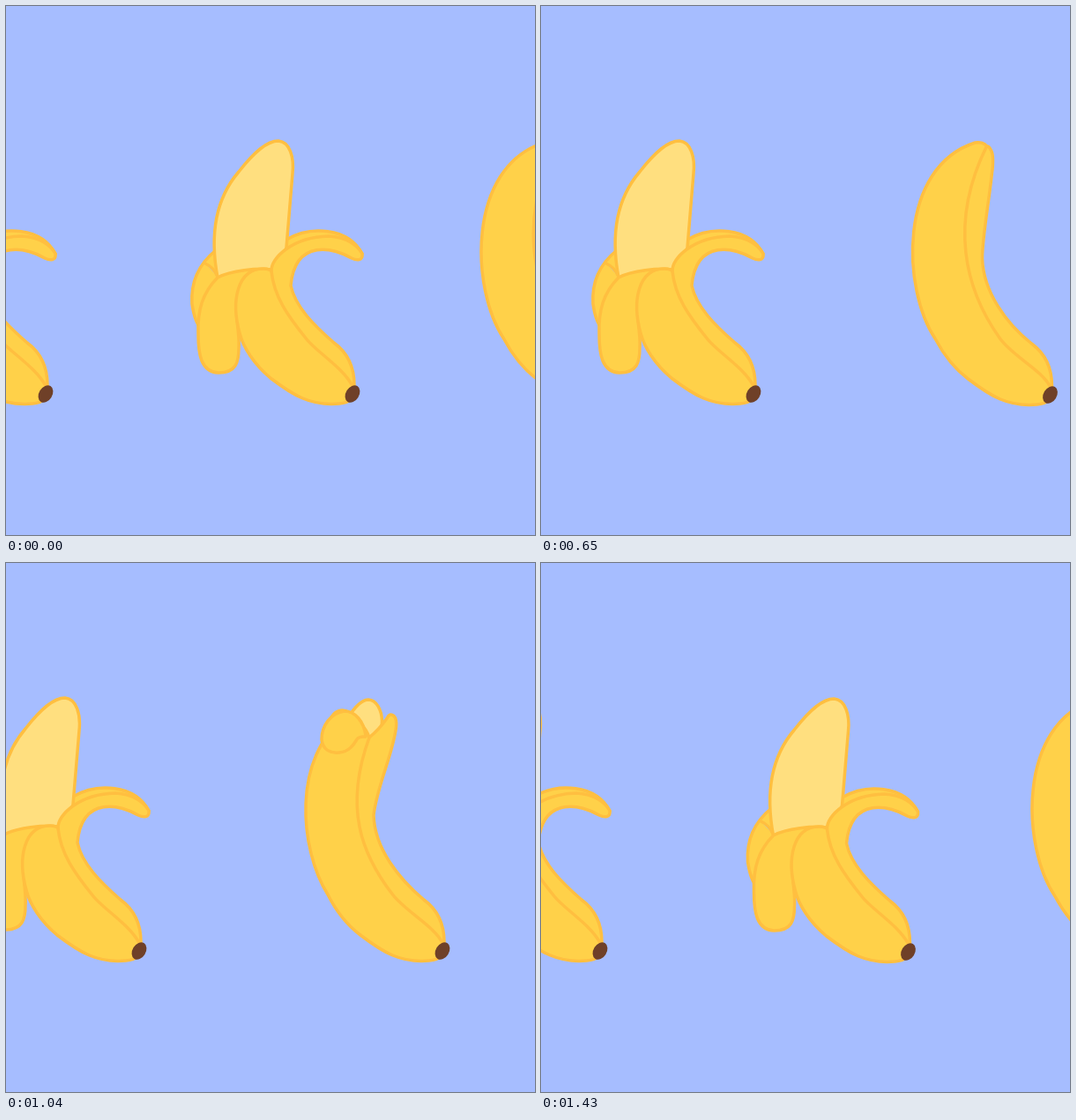
An HTML page with a canvas that plays this animation: 600x600 px, repeating every 1560 ms.

```html
<!DOCTYPE html>
<html lang="en">
<head>
<meta charset="utf-8">
<title>Peeling bananas</title>
<style>
html, body { margin: 0; width: 100%; height: 100%; overflow: hidden; background: #a6bdff; }
canvas { display: block; width: 100vw; height: 100vh; }
</style>
</head>
<body>
<canvas id="stage" width="600" height="600"></canvas>
<script>
const ctx = document.getElementById('stage').getContext('2d');
const STEP = 130, STEPS = 12;
const PEEL = '#ffd149', LINE = '#ffbf40', FLESH = '#ffdf7f', STEM = '#6f4028';

// Each part in three poses: closed, half peeled, open.
const parts = {
  back: [
    'M300 163 C298 161 293 162 290 166 C289 168 289 170 290 172 L300 170 Z M295 168 Q296 168 297 169',
    'M273 176 C262 168 245 173 242 190 C241 196 243 200 246 204 L262 197 Z M258 203 Q259 204 260 206',
    'M238 277 C222 290 209 308 211 338 C213 352 217 362 222 367 L245 330 Z M226 292 Q235 296 240 307'
  ],
  strip: [
    'M322 185 L322 180 C323 176 325 172 326 172 L325 180 Z',
    'M330 210 L332 205 C336 190 346 178 350 182 L342 190 Z',
    'M316 281 L318 265 C345 249 388 251 404 281 L366 263 Z'
  ],
  flesh: [
    'M300 175 C300 172 301 171 302 170 C304 164 307 158 309 158 C313 158 318 162 320 172 L320 180 C319 182 318 183 317 184 Z',
    'M262 200 C262 199 262 198 263 194 C275 172 293 152 309 152 C324 153 330 172 329 186 L327 212 C320 220 305 228 299 238 Z',
    'M240 308 C230 255 240 216 264 188 C282 165 296 153 309 153 C322 154 327 172 325 190 L318 274 C315 285 305 295 301 303 Z'
  ],
  flap: [
    'M326 173 C327 156 320 140 306 139 C294 140 288 155 289 163 C293 172 300 172 306 170 C314 168 316 158 318 160 C321 162 326 172 326 173 Z',
    'M286 219 C281 204 268 196 258 197 C238 200 224 215 223 237 C221 252 232 260 246 260 C262 260 270 252 274 240 C277 230 280 222 286 221 Z',
    'M301 299 C285 297 255 300 240 308 C223 325 217 345 218 372 C218 395 221 415 241 416 C261 416 264 404 264 388 C265 375 262 365 262 350 Z'
  ],
  body: [
    'M321 158 C323 158 324 159 325 161 C327 164 328 168 328 173 C328 178 328 183 327 188 C324 218 316 262 316 285 C317 323 343 359 372 382 C387 393 395 409 395 430 C395 446 390 450 378 451 C345 454 325 441 300 422 C284 410 272 394 263 377 C225 321 220 182 308 154 C314 153 319 155 321 158 Z',
    'M299 238 C322 217 330 202 336 190 C337 180 341 174 348 174 C353 174 354 179 354 184 C351 212 321 245 314 287 C315 325 345 358 372 382 C387 393 395 409 395 430 C395 446 390 450 378 451 C345 454 325 441 300 422 C284 410 272 394 263 375 C237 330 223 255 260 196 C281 202 295 220 299 238 Z',
    'M301 301 C300 286 325 262 366 261 C387 262 399 272 404 281 C405 289 398 289 392 286 C374 275 328 262 323 317 C328 341 349 362 372 382 C387 393 395 409 395 430 C395 446 390 450 378 451 C345 454 325 441 300 422 C281 406 269 387 265 371 C255 335 262 298 292 298 C298 298 301 300 301 301 Z'
  ],
  crease: [
    'M321 158 C278 245 296 320 336 376 C350 396 384 412 393 431',
    'M299 238 C284 310 306 340 337 376 C352 394 384 412 393 431',
    'M301 301 C304 330 320 352 341 378 C352 392 382 410 393 431'
  ]
};

// Stem position at every step, from entering on the right to leaving on the left.
const FIRST = -4;
const stemX = [767, 743, 728, 713, 695, 672, 649, 625.5, 602, 577.5, 553, 523, 495, 467,
  441, 416.5, 393, 365, 337, 305, 273, 241, 209, 181, 151, 121, 94, 67, 45, 22, 0, -23];

// Pose between closed (0), half peeled (1) and open (2).
const pose = n => Math.min(2, Math.max(0, (n - 7) / 2));
const lift = n => n < 8 || n === 11 ? 1 : n === 9 ? -2 : 0;

function blend(name, k) {
  const i = Math.min(1, Math.floor(k));
  const [from, to] = [parts[name][i], parts[name][i + 1]];
  const ends = to.match(/\d+/g);
  let j = 0;
  return new Path2D(from.replace(/\d+/g, a => +a + (ends[j++] - a) * (k - i)));
}

function shape(name, k, fill) {
  const path = blend(name, k);
  if (fill) {
    ctx.fillStyle = fill;
    ctx.fill(path);
  }
  ctx.stroke(path);
}

function banana(n) {
  const x = stemX[n - FIRST];
  if (x === undefined) return;
  const k = pose(n);
  ctx.save();
  ctx.translate(x - 393, lift(n));
  if (k > 0) {
    shape('back', k, PEEL);
    shape('strip', k, PEEL);
    shape('flesh', k, FLESH);
  }
  if (k === 2) shape('flap', k, PEEL);
  shape('body', k, PEEL);
  shape('crease', k);
  if (k > 0 && k < 2) shape('flap', k, PEEL);
  ctx.fillStyle = STEM;
  ctx.beginPath();
  ctx.ellipse(393, 440, 7.5, 10.5, 0.55, 0, 7);
  ctx.fill();
  ctx.restore();
}

function draw() {
  const step = Math.floor(performance.now() / STEP) % STEPS;
  ctx.fillStyle = '#a6bdff';
  ctx.fillRect(0, 0, 600, 600);
  ctx.strokeStyle = LINE;
  ctx.lineWidth = 3.5;
  ctx.lineJoin = ctx.lineCap = 'round';
  for (let lap = -1; lap < 3; lap++) banana(step + lap * STEPS);
  requestAnimationFrame(draw);
}
draw();
</script>
</body>
</html>
```
